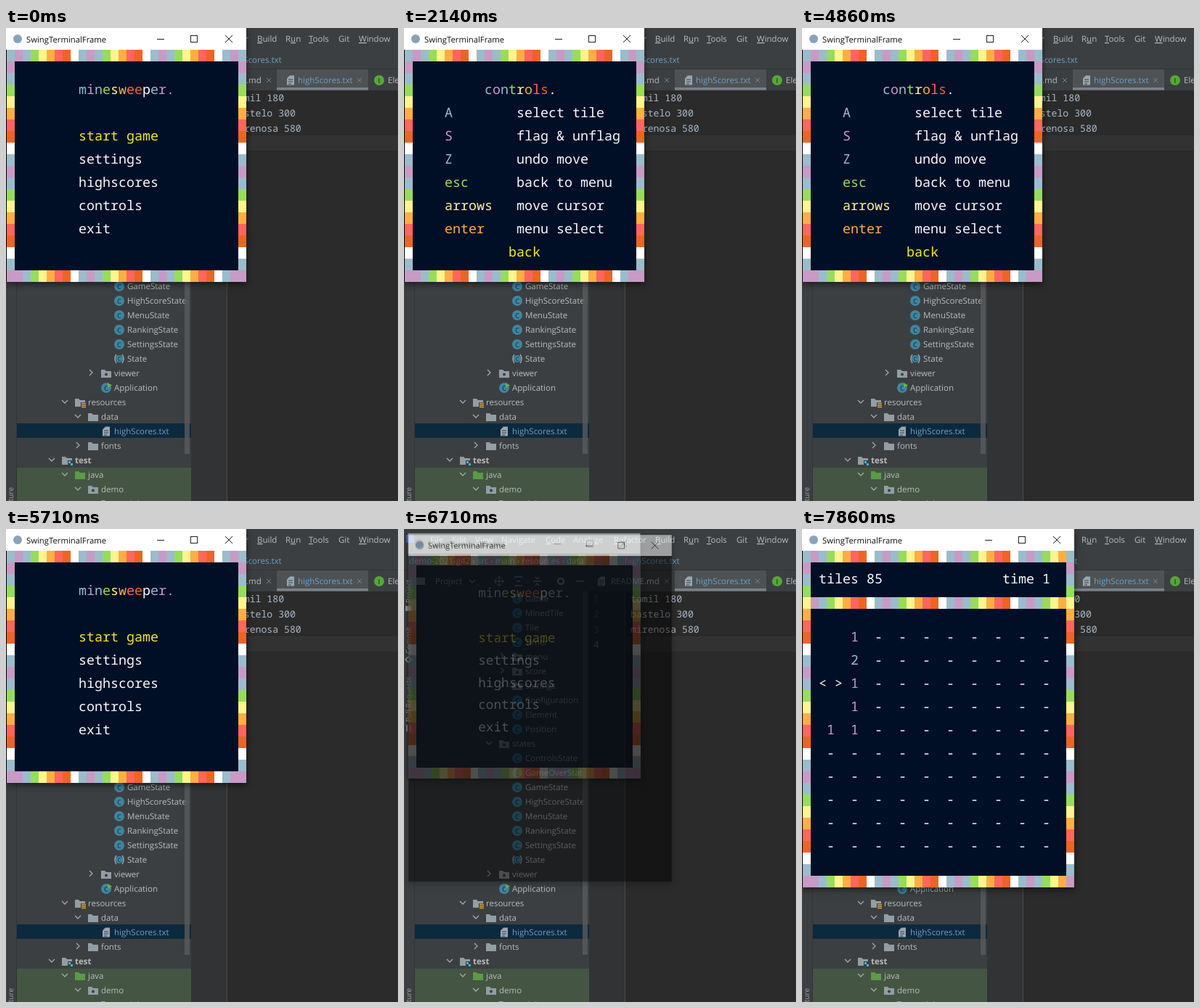
Recreate the animation shown at these times as an HTML page. Size 540 by 652 pixels, loop 8 s.

```html
<!DOCTYPE html>
<html lang="en">
<head>
<meta charset="utf-8">
<title>Terminal game</title>
<style>
html, body { margin: 0; width: 100%; height: 100%; overflow: hidden; background: #2b2b2b; }
svg { display: block; width: 540px; height: 652px; font: 11.5px "Open Sans", "Noto Sans", sans-serif; text-rendering: geometricPrecision; }
text { white-space: pre; }
.term { font: 500 18.333px "Noto Sans Mono", "Liberation Mono", monospace; }
.code { font: 13.17px "Noto Sans Mono", "Liberation Mono", monospace; }
.title { font-size: 11.3px; }
.win { transform-box: view-box; filter: drop-shadow(0 3px 5px rgba(0,0,0,.55)); }
.u { text-decoration: underline; }
</style>
</head>
<body>
<svg id="stage" viewBox="0 0 540 652"></svg>
<script>
const LOOP = 8000, FPS = 7;
const BLUE = '#9bbccb', GREY = '#bbbbbb', PANEL = '#3c3f41', NAVY = '#010f26';
const PAL = [BLUE, '#c89ac6', BLUE, '#97dc5c', '#fff48e', '#ffae42', '#ff665c', '#ee6424', '#ffffff'];
const WHITE = '#f8fafc', PICK = '#f2ea1a';
const CELL_W = 11, CELL_H = 16, TOP = 30;

const range = n => [...Array(n).keys()];
const rect = (x, y, w, h, fill, more = '') =>
  `<rect x="${x}" y="${y}" width="${w}" height="${h}" fill="${fill}" ${more}/>`;
const disc = (x, y, r, fill) => `<circle cx="${x}" cy="${y}" r="${r}" fill="${fill}"/>`;
const line = (d, stroke = '#a4a8aa', w = 1.3) =>
  `<path d="${d}" fill="none" stroke="${stroke}" stroke-width="${w}"/>`;
const text = (x, y, s, fill = GREY, more = '') => `<text x="${x}" y="${y}" fill="${fill}" ${more}>${s}</text>`;
const esc = s => s.replace(/&/g, '&amp;').replace(/</g, '&lt;').replace(/>/g, '&gt;');

/* ---- editor behind the windows ---- */

const folder = (x, y, fill = '#929da4') =>
  `<path d="M${x - 7} ${y - 5}h5l2 2h7v9h-14z" fill="${fill}"/>`;
const page = (x, y) =>
  `<path d="M${x - 1} ${y - 6.5}h6v13h-10v-9z" fill="#9aa7b0"/>` +
  line(`M${x - 3} ${y - 1}h6m-6 3h6m-6 3h4`, '#3a4146', 1);
const letterDisc = (x, y, s, fill, ink = '#263c46') =>
  disc(x, y, 7, fill) + text(x, y + 3.5, s, ink, 'font-size="9.5" font-weight="600" text-anchor="middle"');
const cross = (x, y, r, stroke, w = 1) =>
  line(`M${x - r} ${y - r}l${2 * r} ${2 * r}m0 ${-2 * r}l${-2 * r} ${2 * r}`, stroke, w);

const icons = {
  cls: (x, y) => letterDisc(x, y, 'C', '#3e86a0'),
  abs: (x, y) => disc(x, y, 5, '#3e86a0') +
    text(x, y + 3, 'C', '#263c46', 'font-size="8" font-weight="600" text-anchor="middle"') +
    line(`M${x - 4} ${y - 6}q-4 6 0 12m8 -12q4 6 0 12`, '#9aa7b0', 1.4),
  app: (x, y) => letterDisc(x, y, 'C', '#3e86a0') +
    `<path d="M${x + 2} ${y - 7}l6 3.5l-6 3.5z" fill="#62b543"/>`,
  dir: folder,
  pkg: (x, y) => folder(x, y) + disc(x, y + 1.5, 2, PANEL),
  res: (x, y) => folder(x, y) + rect(x + 1, y, 8, 8, PANEL) +
    line(`M${x + 2} ${y + 1.5}h6m-6 2.5h6m-6 2.5h6`, '#d9a343', 1.4),
  tst: (x, y) => folder(x, y) + rect(x + 1, y, 8, 8, PANEL) +
    rect(x + 2, y + 1, 3, 3, '#40b6e0') + rect(x + 5, y + 4, 3, 3, '#40b6e0'),
  src: (x, y) => folder(x, y, '#5c9a45'),
  txt: page
};
const chevrons = {
  v: (x, y) => line(`M${x - 4} ${y - 2}l4 4l4 -4`),
  '>': (x, y) => line(`M${x - 2} ${y - 4}l4 4l-4 4`)
};

// icon, icon centre, chevron, label
const TREE = `cls 156 - Game
cls 156 - MinedTile
cls 156 - Tile
cls 156 - Timer
pkg 156 > menu
pkg 156 > score
pkg 156 > settings
cls 156 - Configuration
cls 156 - Element
cls 156 - Position
pkg 138 v states
cls 156 - ControlsState
cls 156 - GameOverState
cls 156 - GameState
cls 156 - HighScoreState
cls 156 - MenuState
cls 156 - RankingState
cls 156 - SettingsState
abs 156 - State
pkg 138 > viewer
app 138 - Application
res 102 v resources
dir 120 v data
txt 138 - highScores.txt
dir 120 > fonts
tst 84 v test
src 102 v java
pkg 120 v demo
pkg 138 v model`.split('\n').map(r => r.split(' '));

function tree() {
  return rect(15, 545, 240, 20, '#0d293e') + rect(15, 606, 240, 46, '#445544') +
    TREE.map(([icon, x, chev, label], i) => {
      const y = 96 + 20 * i, cx = +x;
      const fill = icon === 'txt' ? '#6c9fc6' : GREY;
      return icons[icon](cx, y) + (chevrons[chev] ? chevrons[chev](cx - 21, y - 1) : '') +
        text(cx + 11, y + 4, label, fill, icon === 'tst' ? 'font-weight="700"' : '');
    }).join('') + rect(246, 86, 7, 501, '#595b5c', 'opacity=".8"');
}

function menuBar() {
  const items = [[36, '_File'], [66, '_Edit'], [98, '_View'], [134, '_Navigate'], [195, '_Code'],
    [233, 'Analy_ze'], [289, '_Refactor'], [346, '_Build'], [385, 'R_un'], [417, '_Tools'],
    [458, 'Git'], [486, '_Window']];
  return rect(3, 8, 11, 11, '#3f6fc4') + items.map(([x, s]) =>
    text(x, 19, s.replace(/_(.)/, '<tspan class="u">$1</tspan>'))).join('');
}

function stripe() {
  const side = (y, s, anchor) => text(0, 0, s, '#a0a3a5',
    `font-size="10" text-anchor="${anchor}" transform="translate(10 ${y}) rotate(-90)"`);
  return side(102, 'Project', 'start') + rect(2, 106, 8, 7, '#929da4') +
    side(172, 'Commit', 'start') + line('M6 176l4 4l-4 4l-4 -4z') +
    side(266, 'Pull Requests', 'start') + line('M4 270v9m5 -9v9') +
    side(633, 'Structure', 'end') + rect(14, 57, 1, 595, '#323536');
}

function header() {
  return rect(17, 67, 12, 10, '#929da4') + text(43, 76, 'Project') + line('M90 70l4 4l4 -4') +
    `<circle cx="131" cy="72" r="5.5" fill="none" stroke="#a4a8aa"/>` +
    line('M131 65v14m-7 -7h14') + line('M152 66h11m-11 12h11m-8 -6h5') +
    line('M178 72h11m-8 -6l2.500 3l2.500 -3m-5 12l2.500 -3l2.500 3') +
    `<circle cx="216" cy="72" r="4" fill="none" stroke="#a4a8aa" stroke-width="2.500"/>` +
    line('M237 72h11');
}

function tabs() {
  return rect(373, 57, 126, 29, '#4e5254') + rect(373, 82, 126, 3.5, '#7a8087') +
    page(272, 72) + text(285, 76, 'README.md') + cross(362, 72, 3, '#7b7f81') +
    page(392, 72) + text(402, 76, 'highScores.txt', '#6c9fc6') + cross(487, 72, 3, '#7b7f81') +
    letterDisc(514, 72, 'I', '#57a639', '#23401a') + text(526, 76, 'Element');
}

function editor() {
  const rows = ['tomil 180', 'bastelo 300', 'mirenosa 580', ''];
  return rect(255, 86, 50, 566, '#313335') + rect(255, 148, 285, 21, '#323232') +
    rect(304, 86, 1, 566, '#4a4c4d') +
    rows.map((s, i) => text(261, 101 + 21 * i, i + 1, i === 3 ? '#a4a3a3' : '#606366', 'class="code"') +
      text(312, 101 + 21 * i, s, '#a9b7c6', 'class="code"')).join('');
}

const ide = () => rect(0, 0, 540, 652, '#2b2b2b') + rect(0, 0, 540, 86, PANEL) + rect(0, 86, 255, 566, PANEL) +
  rect(0, 56, 540, 1, '#323536') + menuBar() +
  text(7, 48, 'demo-2021-g42 › src › main › resources › data') + text(304, 48, 'highScores.txt', '#6c9fc6') +
  tree() + editor() + header() + tabs() + stripe();

/* ---- terminal windows ---- */

const cell = (c, r, fill) => rect(1 + c * CELL_W, TOP + r * CELL_H, CELL_W, CELL_H, fill, 'shape-rendering="crispEdges"');
const put = (c, r, s, fill = WHITE) => text(1 + c * CELL_W, TOP + r * CELL_H + 13, esc(s), fill, 'class="term"');
const rainbow = (c, r, s) => [...s].map((ch, i) => put(c + i, r, ch, PAL[i % 9])).join('');

function frame(cols, rows, bars) {
  return rect(1, TOP, cols * CELL_W, rows * CELL_H, NAVY) +
    bars.map(r => range(cols).map(c => cell(c, r, PAL[c % 9])).join('')).join('') +
    range(rows).map(r => cell(0, r, PAL[r % 9]) + cell(cols - 1, r, PAL[r % 9])).join('');
}

function chrome(w, h) {
  return rect(0, 0, w, h, '#000') + rect(0, 0, w, TOP, '#fff') +
    disc(16, 15, 6, '#8aa2b8') + text(28, 19.5, 'SwingTerminalFrame', '#111', 'class="title"') +
    line(`M${w - 123} 15.500h10`, '#222', 1) +
    `<rect x="${w - 76.5}" y="10.5" width="9" height="9" fill="none" stroke="#222"/>` +
    cross(w - 24, 15, 5, '#222');
}

function menu(pick) {
  return rainbow(9, 3, 'minesweeper.') +
    ['start game', 'settings', 'highscores', 'controls', 'exit']
      .map((s, i) => put(9, 7 + 2 * i, s, i === pick ? PICK : WHITE)).join('');
}

function controls() {
  const keys = [['A', 'select tile'], ['S', 'flag & unflag'], ['Z', 'undo move'],
    ['esc', 'back to menu'], ['arrows', 'move cursor'], ['enter', 'menu select']];
  return rainbow(10, 3, 'controls.') +
    keys.map(([k, s], i) => put(5, 5 + 2 * i, k, PAL[i]) + put(14, 5 + 2 * i, s)).join('') +
    put(13, 17, 'back', PICK);
}

function game(row, opened, secs) {
  const shown = [' 1', ' 2', ' 1', ' 1', '11'];
  let out = put(2, 2, opened ? 'tiles 85' : 'tiles 95') + put(25, 2, 'time ' + secs);
  for (const y of range(10)) for (const x of range(10)) {
    const ch = (opened && shown[y] && shown[y][x]) || '-';
    if (ch !== ' ') out += put(3 + 3 * x, 7 + 2 * y, ch, PAL[ch] || WHITE);
  }
  return out + put(2, 7 + 2 * row, '<') + put(4, 7 + 2 * row, '>');
}

const SMALL = { w: 331, h: 350 }, BIG = { w: 375, h: 494 };
const SWAP = 6610, SWAP_MS = 200;

// start time, screen
const SCENES = [
  [0, () => menu(0)], [430, () => menu(1)], [710, () => menu(2)], [1000, () => menu(3)],
  [1710, controls], [5430, () => menu(0)],
  [6860, () => game(0, false, 0)], [7000, () => game(1, false, 0)], [7140, () => game(2, false, 0)],
  [7430, () => game(2, true, 0)], [7710, () => game(2, true, 1)]
];

const $ = id => document.getElementById(id);
$('stage').innerHTML = ide() +
  `<g id="small" class="win">${chrome(SMALL.w, SMALL.h)}${frame(30, 20, [0, 19])}<g id="page"></g></g>` +
  `<g id="big" class="win">${chrome(BIG.w, BIG.h)}<g id="field">${frame(34, 29, [0, 4, 28])}<g id="board"></g></g></g>`;

function pose(id, { w, h }, amount) {
  const el = $(id), s = 1 - 0.066 * (1 - amount), cx = w / 2, cy = h / 2;
  el.style.display = amount > 0 ? '' : 'none';
  el.style.opacity = amount;
  el.setAttribute('transform', `translate(${cx} ${cy}) scale(${s}) translate(${-cx} ${-cy})`);
}

let shownScene = -1, shownTime = -1;
function draw(ms) {
  const step = Math.floor((ms + 5) * FPS / 1000);
  const t = Math.round(step * 100 / FPS) * 10 % LOOP;
  if (t === shownTime) return;
  shownTime = t;
  const p = Math.min(1, Math.max(0, (t - SWAP) / SWAP_MS));
  pose('small', SMALL, 1 - p);
  pose('big', BIG, p);
  $('field').style.display = p === 1 ? '' : 'none';
  const n = SCENES.filter(([at]) => at <= t).length - 1;
  if (n !== shownScene) {
    shownScene = n;
    $(n < 6 ? 'page' : 'board').innerHTML = SCENES[n][1]();
  }
}

const start = performance.now();
function tick() {
  draw((performance.now() - start) % LOOP);
  requestAnimationFrame(tick);
}
tick();
</script>
</body>
</html>
```
